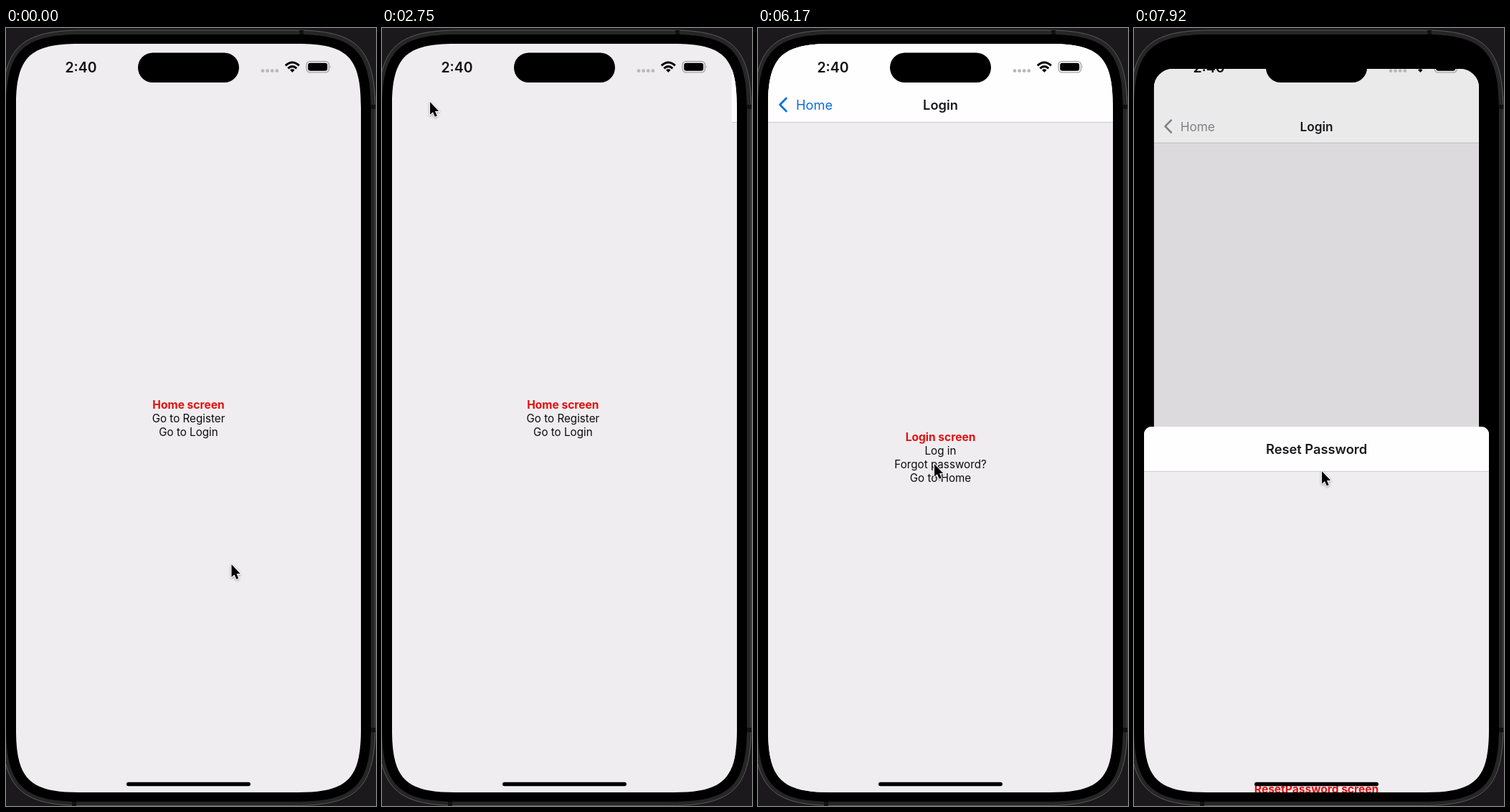
Animation, 516 px wide and 1085 px high, one loop 8 s. Source, as an HTML page:

```html
<!DOCTYPE html>
<html lang="en">
<head>
<meta charset="utf-8">
<title>Stack navigation</title>
<style>
  html, body { margin: 0; width: 100%; height: 100%; overflow: hidden; background: #1b191b; }
  body { position: relative; font-family: Inter, sans-serif; }
  svg, .screen, .card, .page, .dim, .sheet, .bar, .body, .title, .back { position: absolute; }
  svg { left: 0; top: 0; }
  .screen { left: 14px; top: 22px; width: 481px; height: 1044px; background: #000; }
  .card { inset: 0; overflow: hidden; transform-origin: 50% 0; }
  .page { inset: 0; background: #efedf0; }
  .dim { inset: 0; background: #000; }
  .sheet { left: 0; top: 0; width: 481px; height: 967px; border-radius: 11px 11px 0 0; overflow: hidden; background: #efedf0; }
  .bar { left: 0; right: 0; top: 0; background: #fffeff; border-bottom: 1px solid #c9c8cb; font-size: 18.3px; line-height: 22px; }
  .title { left: 0; right: 0; bottom: 13px; text-align: center; font-weight: 600; color: #1a191c; }
  .sheet .title { bottom: 20px; }
  .back { left: 39px; bottom: 13px; color: #0b6ee0; }
  .back svg { left: -25px; fill: none; stroke: currentColor; stroke-width: 2.7; stroke-linecap: round; stroke-linejoin: round; }
  .body { left: 0; right: 0; bottom: 0; display: flex; flex-direction: column; align-items: center; justify-content: center; font-size: 15.2px; line-height: 19px; color: #0c0b0d; }
  .body div { border-radius: 2px; white-space: nowrap; }
  .body div:first-child { font-weight: 700; font-size: 15.55px; color: #e4100f; }
  .body .pressed { background: rgba(0,0,0,.25); box-shadow: 0 0 0 2px rgba(0,0,0,.25); }
</style>
</head>
<body>
<svg width="516" height="1085">
  <path id="frame" fill="#272627" stroke="#5b5a5b"/>
  <g fill="#121112">
    <rect x="409" y="3" width="6" height="7"/>
    <rect x="92" y="1078" width="6" height="7"/>
    <rect x="508" y="107" width="7" height="6"/>
    <rect x="508" y="976" width="7" height="6"/>
  </g>
  <path id="bezel"/>
</svg>

<div class="screen" id="screen">
  <div class="card" id="card">
    <div class="page" id="home"></div>
    <div class="dim" id="homeDim"></div>
    <div class="page" id="register"></div>
    <div class="page" id="login"></div>
    <div class="dim" id="cardDim"></div>
  </div>
  <div class="sheet" id="reset"></div>
</div>

<svg id="status" width="516" height="1085">
  <text x="104.5" y="62" text-anchor="middle" font-size="19.5" font-weight="600" fill="#111012">2:40</text>
  <path d="M358 59.7h20" stroke="#b8b7ba" stroke-width="4.8" stroke-linecap="round" stroke-dasharray="0 6.6"/>
  <path d="M389.8 52.4Q399.3 43.6 408.8 52.4M393.3 56.3Q399.3 51 405.3 56.3" fill="none" stroke="#000" stroke-width="3"/>
  <path d="M396 58.6Q399.3 56.1 402.6 58.6L399.3 62Z"/>
  <rect x="419" y="46.5" width="31.5" height="15.5" rx="5" fill="none" stroke="#929194" stroke-width="1.1"/>
  <rect x="421.2" y="48.7" width="27" height="11.1" rx="3.2"/>
  <path d="M452 51.8q1.8 2.4 0 4.9z" fill="#929194"/>
</svg>

<svg width="516" height="1085">
  <rect x="184" y="34.5" width="141" height="41.5" rx="20.7"/>
  <rect x="168" y="1051.7" width="173" height="5.6" rx="2.8"/>
  <path id="cursor" d="M0 0V17.8L4 14.2L6.8 20.7L9.8 19.4L7 13.1H12.2Z" stroke="#fff" stroke-width="2.2"
    paint-order="stroke" stroke-linejoin="round" style="filter:drop-shadow(0 1.5px 1.5px rgba(0,0,0,.35))"/>
</svg>

<script>
const LOOP = 8000, FPS = 12, WIDTH = 481, HEIGHT = 1044;
const SHEET_TOP = 77, SHEET_TRAVEL = HEIGHT - SHEET_TOP;
const PUSH_REGISTER = 1030, POP_REGISTER = 2424, PUSH_LOGIN = 3836, OPEN_SHEET = 6407, DRAG = 7500;
const PRESS = 115;
const $ = id => document.getElementById(id);
const mix = (a, b, p) => a + (b - a) * p;
const clamp = v => Math.min(1, Math.max(0, v));
const smooth = p => p * p * (3 - 2 * p);

// Rectangle with continuous corners of nominal radius r
function squircle(x, y, w, h, r) {
  const e = 1.43 * r, c = .304 * r, k = e - c;
  return `M${x} ${y + e}c0 ${-k} ${c} ${-e} ${e} ${-e}h${w - 2 * e}c${k} 0 ${e} ${c} ${e} ${e}` +
    `v${h - 2 * e}c0 ${k} ${-c} ${e} ${-e} ${e}h${2 * e - w}c${-k} 0 ${-e} ${-c} ${-e} ${-e}Z`;
}

function fill(id, lines, barHeight = 0, title = '', back = false) {
  const chevron = '<svg width="16" height="22"><path d="M11.4 2L2.6 11L11.4 20"/></svg>';
  const bar = barHeight
    ? `<div class="bar" style="height:${barHeight}px">` +
      (back ? `<div class="back">${chevron}Home</div>` : '') +
      `<div class="title">${title}</div></div>`
    : '';
  const rows = lines.map(line => `<div>${line}</div>`).join('');
  $(id).innerHTML = `${bar}<div class="body" style="top:${barHeight}px">${rows}</div>`;
}

$('frame').setAttribute('d', squircle(-5.5, 3, 520.5, 1081.5, 80));
$('bezel').setAttribute('d', squircle(0, 9, 509, 1070, 74));
$('screen').style.clipPath = `path("${squircle(0, 0, WIDTH, HEIGHT, 61.5)}")`;

fill('home', ['Home screen', 'Go to Register', 'Go to Login']);
fill('register', ['Register screen', 'Go to Home'], 109, 'Register', true);
fill('login', ['Login screen', 'Log in', 'Forgot password?', 'Go to Home'], 109, 'Login', true);
fill('reset', ['ResetPassword screen', 'Go to Home'], 62, 'Reset Password');

const row = (id, n) => $(id).querySelectorAll('.body div')[n];
const backOf = id => $(id).querySelector('.back');
const links = [
  [row('home', 1), PUSH_REGISTER],
  [row('home', 2), PUSH_LOGIN],
  [row('login', 2), OPEN_SHEET]
];

// Pointer moves, each eased from wherever the last one ended
const moves = [
  { from: 0, to: 880, x: 276, y: 547 },
  { from: 1500, to: 2300, x: 67, y: 103 },
  { from: 2750, to: 3600, x: 252, y: 563 },
  { from: 4200, to: 4650, x: 293, y: 588 },
  { from: 4700, to: 5000, x: 249, y: 595 },
  { from: 5350, to: 5840, x: 289, y: 569 },
  { from: 5930, to: 6160, x: 246, y: 608 },
  { from: 6950, to: 7420, x: 261, y: 140 },
  { from: DRAG, to: 7920, x: 262, y: 618 }
];

function pointer(t) {
  let x = 314.5, y = 748;
  for (const m of moves) {
    const p = smooth(clamp((t - m.from) / (m.to - m.from)));
    x = mix(x, m.x, p);
    y = mix(y, m.y, p);
  }
  return [x, y];
}

// Distance left to go on a critically damped spring, 1 to 0
function left(t, start, rate = 19) {
  const x = Math.max(0, t - start) / 1000 * rate;
  const v = (1 + x) * Math.exp(-x);
  return v < .0005 ? 0 : v;
}

const pressed = (t, release) => t >= release - PRESS && t < release;

function slide(id, offset) {
  $(id).style.transform = `translateX(${offset * WIDTH}px)`;
  $(id).style.visibility = offset < 1 ? 'visible' : 'hidden';
}

function draw(t) {
  const [x, y] = pointer(t);
  $('cursor').setAttribute('transform', `translate(${x} ${y})`);

  const register = t < POP_REGISTER ? left(t, PUSH_REGISTER) : 1 - left(t, POP_REGISTER);
  const login = left(t, PUSH_LOGIN);
  const covered = 1 - Math.min(register, login);
  slide('register', register);
  slide('login', login);
  $('home').style.transform = `translateX(${-.3 * WIDTH * covered}px)`;
  $('homeDim').style.opacity = .117 * covered;

  for (const [link, release] of links) link.classList.toggle('pressed', pressed(t, release));
  backOf('register').style.opacity = pressed(t, POP_REGISTER) ? .3 : 1;

  const drag = t > DRAG ? (y - 140) * .956 : 0;
  const sheetY = SHEET_TOP + SHEET_TRAVEL * left(t, OPEN_SHEET, 21) + drag;
  $('reset').style.transform = `translateY(${sheetY}px)`;

  // The card behind shrinks and darkens as the sheet rises
  const p = clamp((HEIGHT - sheetY) / SHEET_TRAVEL);
  const inset = 22 * Math.pow(p, .72), top = 66.5 * p;
  $('card').style.transform = `translateY(${top}px) scale(${1 - 2 * inset / WIDTH})`;
  $('card').style.borderRadius = `${mix(50, 8, p)}px`;
  $('cardDim').style.opacity = .147 * p;
  $('status').style.clipPath = `inset(${22 + top}px 0 0 0)`;

  const fade = clamp((t - OPEN_SHEET) / 220);
  backOf('login').style.color = `rgb(${mix(11, 138, fade)},${mix(110, 138, fade)},${mix(224, 142, fade)})`;
}

function tick() {
  const t = performance.now() % LOOP;
  const step = Math.floor(Math.floor(t / 10) * 10 * FPS / 1000 + 1e-6);
  draw(step * 1000 / FPS);
  requestAnimationFrame(tick);
}
tick();
</script>
</body>
</html>
```
